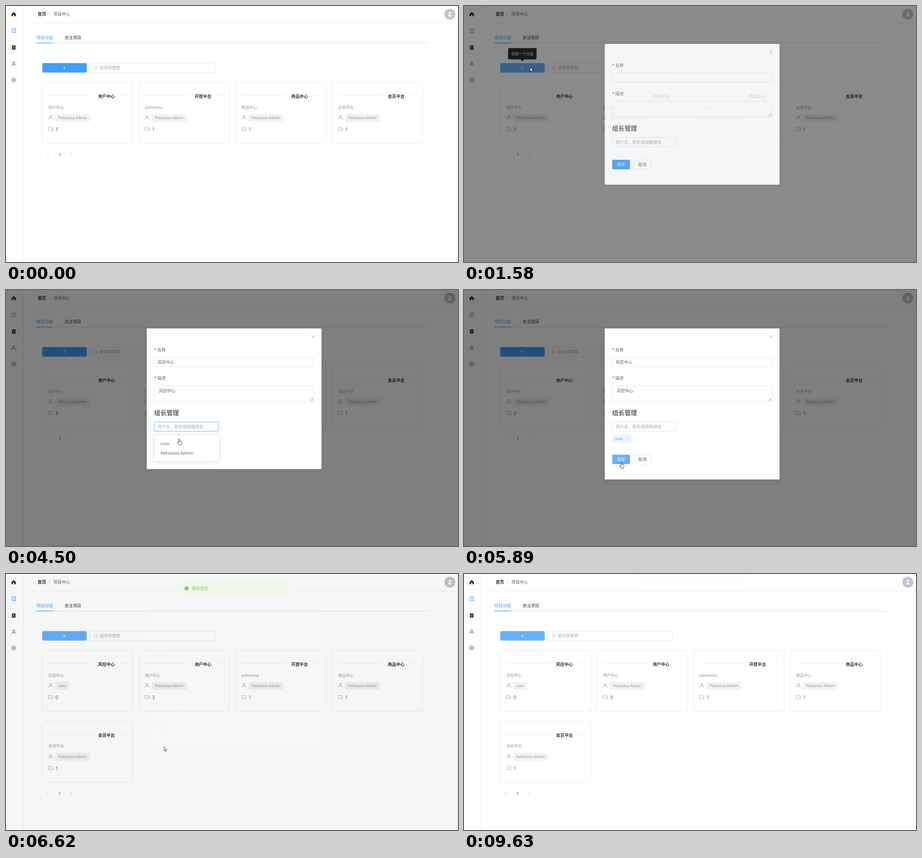
An HTML page for the animation above (9760 ms loop, 995 by 563 pixels).

```html
<!DOCTYPE html>
<html lang="zh-CN">
<head>
<meta charset="utf-8">
<title>项目中心</title>
<style>
html, body { margin: 0; width: 100%; height: 100%; overflow: hidden; background: #fff; }
svg { display: block; width: 995px; height: 563px; font-family: "Noto Sans", "Noto Sans CJK SC", "Noto Sans CJK", sans-serif; }
text { white-space: pre; }
.card .frame { fill: #fff; stroke: #e4e7ed; stroke-width: .8; }
.card .edit { display: none; }
.card.hot .edit { display: inline; }
.card.hot .rest { display: none; }
.card.hot .frame { filter: drop-shadow(0 1px 3.5px rgba(0, 0, 0, .14)); }
.field { fill: #fff; stroke: #dcdfe6; stroke-width: .8; }
.field.on { stroke: #409eff; }
.pop { filter: drop-shadow(0 1px 4px rgba(0, 0, 0, .12)); }
</style>
</head>
<body>
<svg id="stage" viewBox="0 0 995 563"></svg>
<script>
const LOOP = 9760, STEP = 65;
const BLUE = '#409eff', LIGHT = '#66b1ff', INK = '#303133', TEXT = '#606266',
      DIM = '#909399', PALE = '#a8abb2', EDGE = '#dcdfe6', GREEN = '#67c23a';

// ---- drawing helpers ----
const text = (x, cy, s, size = 9.2, fill = TEXT, more = '') =>
  `<text x="${x}" y="${cy + size * .38}" font-size="${size}" fill="${fill}" ${more}>${s}</text>`;
const rect = (x, y, w, h, fill, more = '') =>
  `<rect x="${x}" y="${y}" width="${w}" height="${h}" rx="2.4" fill="${fill}" ${more}/>`;
const field = (id, x, y, w, h) =>
  `<rect id="${id}" class="field" x="${x}" y="${y}" width="${w}" height="${h}" rx="2.4"/>`;
const line = (d, color, w = .8, more = '') =>
  `<path d="${d}" fill="none" stroke="${color}" stroke-width="${w}" ${more}/>`;
const at = (x, y, body) => `<g transform="translate(${x} ${y})">${body}</g>`;
const group = (id, body) => `<g id="${id}">${body}</g>`;
const bold = 'font-weight="700"';

const gearPath = () => {
  let d = '';
  for (let i = 0; i < 48; i++) {
    const a = i * Math.PI / 24, r = 4.5 + .5 * Math.cos(6 * a);
    d += (i ? 'L' : 'M') + (r * Math.sin(a)).toFixed(2) + ' ' + (-r * Math.cos(a)).toFixed(2);
  }
  return d + 'Z';
};
const icon = {
  home: `<path d="M0-4.8L4.8-.6V4.6H1.4V1.2H-1.4V4.6H-4.8V-.6Z" fill="${INK}"/>`,
  book: line('M-4-4.6H4V4.6H-4ZM-4 2.6H4M-1.2-4.6V-.6L.5-1.8L2.2-.6V-4.6', BLUE),
  clip: `<path d="M-4-4H-2V-5H2V-4H4V5H-4Z" fill="${INK}"/>` + line('M-2.2-2.9H2.2M-2.2 0H2.2M-2.2 2.3H2.2', '#fff', .7),
  user: c => line('M0-4.6A2.3 2.3 0 1 1 0 0A2.3 2.3 0 1 1 0-4.6M-4.3 4.7V4A2.7 2.7 0 0 1-1.6 1.4H1.6A2.7 2.7 0 0 1 4.3 4V4.7', c, .85),
  gear: line(gearPath(), INK, .85) + `<circle r="1.8" fill="none" stroke="${INK}" stroke-width=".85"/>`,
  folder: line('M-4.6-3.5H-1.2L0-2.2H4.6V3.7H-4.6Z', DIM, .8),
  edit: line('M.6-3.4H-3.5V3.5H3.4V-.4M-1.2 1.2L-.9-.5L3-4L4-3L.4 .9Z', TEXT, .8),
  cross: c => line('M-3-3L3 3M3-3L-3 3', c, .8)
};

const ADMIN = 'Peltavosa Admin';
const groups = [
  ['风控中心', '风控中心', 'ruxo', 0],
  ['用户中心', '用户中心', ADMIN, 3],
  ['开放平台', 'peltavosa', ADMIN, 1],
  ['商品中心', '商品中心', ADMIN, 1],
  ['会员平台', '会员平台', ADMIN, 1]
];
const spot = i => [79.8 + i % 4 * 212.6, 168 + (i >> 2) * 155.8];

const card = ([title, note, owner, count], i) =>
  `<g class="card" transform="translate(${spot(i)})">
    <rect class="frame" x=".2" y=".2" width="199.2" height="134" rx="2.4"/>` +
  line('M13.5 29.4H96.5M173 29.4H187', EDGE, .75) +
  line('M96.5 29.4H110.5', EDGE, .75, 'class="rest"') +
  `<g class="edit">${at(113.7, 30, icon.edit)}</g>` +
  text(123, 30.6, title, 9.2, INK, bold) +
  text(13.5, 54.3, note, 8.5, DIM) +
  at(18.5, 77, icon.user(DIM)) +
  rect(29.2, 70.4, owner === ADMIN ? 75.2 : 29, 15.4, '#f4f4f5', 'stroke="#e4e4e7" stroke-width=".7"') +
  text(35.5, 78.3, owner, 8, DIM) +
  at(18.6, 102.4, icon.folder) +
  text(29, 103.3, count, 10.5, TEXT) + '</g>';

const page = () =>
  line('M37.7 0V563', '#e4e4ea') + line('M51 37.7H995', '#ebebf0') +
  at(17, 18, icon.home) + at(17, 54.5, icon.book) + at(17, 91, icon.clip) +
  at(17, 127.3, icon.user(INK)) + at(17, 162.7, icon.gear) +
  text(69.8, 18, '首页', 9.2, INK, bold) + text(94.3, 18, '/', 9.2, PALE) + text(104.3, 18, '项目中心') +
  `<circle cx="977" cy="18" r="12" fill="#c0c4cc"/><circle cx="977" cy="15.6" r="2.5" fill="#fff"/>
   <path d="M972.6 22.8C972.6 17.6 981.4 17.6 981.4 22.8Z" fill="#fff"/>` +
  line('M66.8 81.3H930', '#e4e7ed', 1.3) + line('M66.8 81.3H103.4', BLUE, 1.3) +
  text(66.8, 69.3, '项目分组', 9.2, BLUE) + text(128.8, 69.3, '关注项目', 9.2, INK) +
  rect(79.8, 125.5, 97.8, 21, BLUE, 'id="add"') + line('M125 136H132M128.5 132.5V139.5', '#fff', .8) +
  field('search', 185.4, 125.8, 273.8, 20.6) +
  `<circle cx="197" cy="135.6" r="3.5" fill="none" stroke="${PALE}" stroke-width=".8"/>` +
  line('M199.5 138.1L201.3 139.9', PALE) + text(206, 136, '组名称搜索', 9.2, PALE) +
  group('before', groups.slice(1).map(card).join('')) +
  group('after', groups.map(card).join('')) +
  group('pager', line('M94 323.2L91 326.2L94 329.2M142.4 323.2L145.4 326.2L142.4 329.2', PALE) +
    text(118, 326.2, '1', 9, BLUE, bold + ' text-anchor="middle"'));

const tip = () => group('tip',
  rect(97, 92.5, 62.8, 25, INK) + `<path d="M124.5 117L128.5 122.3L132.5 117Z" fill="${INK}"/>` +
  text(104.6, 105.4, '创建一个分组', 8, '#fff'));

const modal = () => group('overlay',
  '<rect width="995" height="563" fill="#000" opacity=".5"/>' +
  group('dialog',
    '<rect id="panel" class="pop" x="309.8" y="84.4" width="384.8" height="309.6" rx="1.3" fill="#fff"/>' +
    at(676.2, 102.8, icon.cross(DIM)) +
    text(326.3, 131.3, '*') + text(333, 131.3, '名称') + field('name', 326.5, 148.3, 351.2, 20.4) +
    text(333.8, 158.5, '', 9.2, TEXT, 'id="nameText"') +
    text(326.3, 194, '*') + text(333, 194, '描述') + field('note', 326.5, 210.6, 351.2, 34.6) +
    text(336.2, 221.8, '', 9.2, TEXT, 'id="noteText"') +
    line('M670.6 243.4L676 238M673.6 243.4L676 241', '#555') +
    text(326, 270.2, '组长管理', 13.7, TEXT, bold) +
    field('leader', 326.5, 290.2, 142, 20.4) + text(333.8, 300.4, '用户名、昵称或邮箱搜索', 9.2, PALE) +
    group('picked', rect(326.5, 319, 41, 15.4, '#ecf5ff', 'stroke="#d9ecff" stroke-width=".7"') +
      text(332.5, 326.8, 'ruxo', 8, BLUE) + at(359.5, 326.8, `<g transform="scale(.6)">${icon.cross(BLUE)}</g>`)) +
    group('actions', rect(326.3, 339.4, 39.2, 20.8, BLUE, 'id="save"') + text(336.6, 349.8, '保存', 9.2, '#fff') +
      rect(373.4, 339.7, 38.7, 20.2, '#fff', `stroke="${EDGE}" stroke-width=".8"`) + text(383.5, 349.8, '取消')) +
    group('menu', `<path class="pop" d="M328.5 318.6H393.5L397.5 315L401.5 318.6H467.5Q469.5 318.6 469.5 320.6V375Q469.5 377 467.5 377H328.5Q326.5 377 326.5 375V320.6Q326.5 318.6 328.5 318.6Z" fill="#fff" stroke="#e4e7ed" stroke-width=".7"/>` +
      rect(327, 326.2, 142, 22, '#f5f7fa', 'id="item"') +
      text(340, 337.2, 'ruxo') + text(340, 359, ADMIN))));

const toast = () => group('toast',
  rect(379, 22, 247.4, 31.2, '#f0f9eb', 'stroke="#e1f3d8" stroke-width=".7"') +
  `<circle cx="397.5" cy="37.6" r="4.5" fill="${GREEN}"/>` + line('M395.3 37.7L396.9 39.3L399.8 36.3', '#fff', .9) +
  text(408.6, 37.6, '保存成功', 9.2, GREEN));

const pointer = () => group('cursor',
  '<path id="arrow" d="M0 0V9L2.1 7.1L3.5 10.2L4.9 9.6L3.5 6.5H6.3Z" fill="#fff" stroke="#111" stroke-width=".75"/>' +
  '<path id="hand" d="M-1 1Q0-.6 1 1V5L4.6 5.9Q5.6 6.3 5.3 7.6L4.4 11.3V13H-1.4V11.6L-4 8.2Q-4.2 6.6-2.6 7.2L-1 8.5Z" fill="#fff" stroke="#111" stroke-width=".8"/>' +
  line('M-1.6-5H1.6M0-5V5M-1.6 5H1.6', '#111', .8, 'id="beam"'));

const stage = document.getElementById('stage');
stage.innerHTML = page() + tip() + modal() + toast() + pointer();
const el = {};
stage.querySelectorAll('[id]').forEach(n => el[n.id] = n);

// ---- timing ----
const active = [[250, 910], [1320, 2240], [2300, 3240], [3310, 4230], [4300, 5230], [5490, 5630],
  [5890, 5890], [6090, 6150], [6350, 7280], [7350, 7960], [8420, 9370], [9430, 9630]];
const OPEN = 1397, CLOSE = 6404, GONE = 9385, PICK = 4720;

// The screen refreshes in steps while something is active and rests otherwise.
const snap = t => {
  const span = active.filter(s => s[0] <= t).pop();
  return span ? Math.min(span[0] + Math.floor((t - span[0]) / STEP) * STEP, span[1]) : 0;
};
const clamp = x => Math.max(0, Math.min(1, x));
// cubic-bezier(.25, .1, .25, 1)
const ease = v => {
  const x = clamp(v);
  let u = x;
  for (let i = 0; i < 6; i++) u -= (.75 * u * (1 - u) + u ** 3 - x) / (.75 - 1.5 * u + 3 * u * u);
  return .3 * u * (1 - u) ** 2 + 3 * u * u * (1 - u) + u ** 3;
};
const ramp = (t, start, length) => ease((t - start) / length);
const within = (t, a, b) => t >= a && t < b;

const path = [
  [250, 838, 514], [840, 146, 135], [1640, 146, 135], [2240, 129, 134], [2300, 133, 134], [2640, 420, 158],
  [2980, 420, 158], [3180, 420, 228], [3850, 420, 228], [4120, 390, 301], [4340, 386, 308], [4490, 381.5, 327],
  [4620, 366, 334], [4760, 366, 334], [5200, 346, 378], [5885, 346, 378], [5890, 347, 379], [6085, 347, 379],
  [6150, 348, 380], [7345, 348, 380], [7540, 203.5, 230.5], [8400, 203.5, 230.5], [9340, 941, 552]
];
const cursorAt = t => {
  const i = path.findIndex(p => p[0] > t);
  if (i < 1) return path[i < 0 ? path.length - 1 : 0].slice(1);
  const [a, b] = [path[i - 1], path[i]], k = (t - a[0]) / (b[0] - a[0]), s = k * k * (3 - 2 * k);
  return [a[1] + (b[1] - a[1]) * s, a[2] + (b[2] - a[2]) * s];
};

// ---- rendering ----
const show = (node, on) => node.style.display = on ? '' : 'none';
const move = (node, x, y) => node.setAttribute('transform', `translate(${x} ${y})`);
const typed = (t, start, rate) => t < CLOSE ? '风控中心'.slice(0, Math.max(0, Math.floor((t - start) / rate))) : '';

function render(t) {
  const [x, y] = cursorAt(t);
  const saved = t >= CLOSE;
  const inside = (x0, y0, w, h) => x >= x0 && x <= x0 + w && y >= y0 && y <= y0 + h;
  const visible = within(t, 250, 9365);

  show(el.before, !saved);
  show(el.after, saved);
  move(el.pager, 0, saved ? 155.8 : 0);
  const free = visible && (t < OPEN || t > CLOSE + 300);
  for (const list of [el.before, el.after])
    [...list.children].forEach((c, i) => c.classList.toggle('hot', free && inside(...spot(i), 199.5, 134)));

  const onAdd = t < 1650 && visible && inside(79.8, 125.5, 97.8, 21);
  el.add.setAttribute('fill', onAdd || saved ? LIGHT : BLUE);
  el.tip.style.opacity = ramp(t, 720, 150) * (1 - ramp(t, 1850, 200));

  const o = ramp(t, OPEN, 281) * (1 - ramp(t, CLOSE, 300));
  show(el.overlay, o > 0);
  el.overlay.style.opacity = el.dialog.style.opacity = o;
  move(el.dialog, 0, -12.8 * (1 - o));

  el.nameText.textContent = typed(t, 2660, 80);
  el.noteText.textContent = typed(t, 3380, 110);
  el.name.classList.toggle('on', within(t, 2640, 3180));
  el.note.classList.toggle('on', within(t, 3180, 4130));
  el.leader.classList.toggle('on', within(t, 4130, 5400));

  const picked = within(t, PICK, CLOSE);
  show(el.picked, picked);
  move(el.actions, 0, picked ? 22.8 : 0);
  el.panel.setAttribute('height', picked ? 332.4 : 309.6);
  el.save.setAttribute('fill', within(t, 5490, 5630) ? '#3a8ee6' : within(t, 5150, CLOSE) ? LIGHT : BLUE);

  const m = ramp(t, 4140, 200) * (1 - ramp(t, PICK, 200));
  show(el.menu, m > 0);
  el.menu.style.opacity = m;
  el.menu.setAttribute('transform', `translate(0 ${318 * (1 - m)}) scale(1 ${m})`);
  show(el.item, t > 4530);

  el.toast.style.opacity = ramp(t, CLOSE, 300) * (1 - ramp(t, GONE, 300));
  move(el.toast, 0, -31.5 * (1 - ramp(t, CLOSE, 400) + ramp(t, GONE, 400)));

  const beam = within(t, 2560, 4330) && (inside(326, 148, 352, 21) || inside(326, 210, 352, 35) || inside(326, 290, 142, 21));
  const hand = within(t, 4400, 4760) || within(t, 5140, CLOSE);
  show(el.cursor, visible);
  show(el.beam, beam);
  show(el.hand, hand);
  show(el.arrow, !beam && !hand);
  move(el.cursor, x, y);
}

const begin = performance.now();
function tick() {
  render(snap((performance.now() - begin) % LOOP));
  requestAnimationFrame(tick);
}
tick();
</script>
</body>
</html>
```
